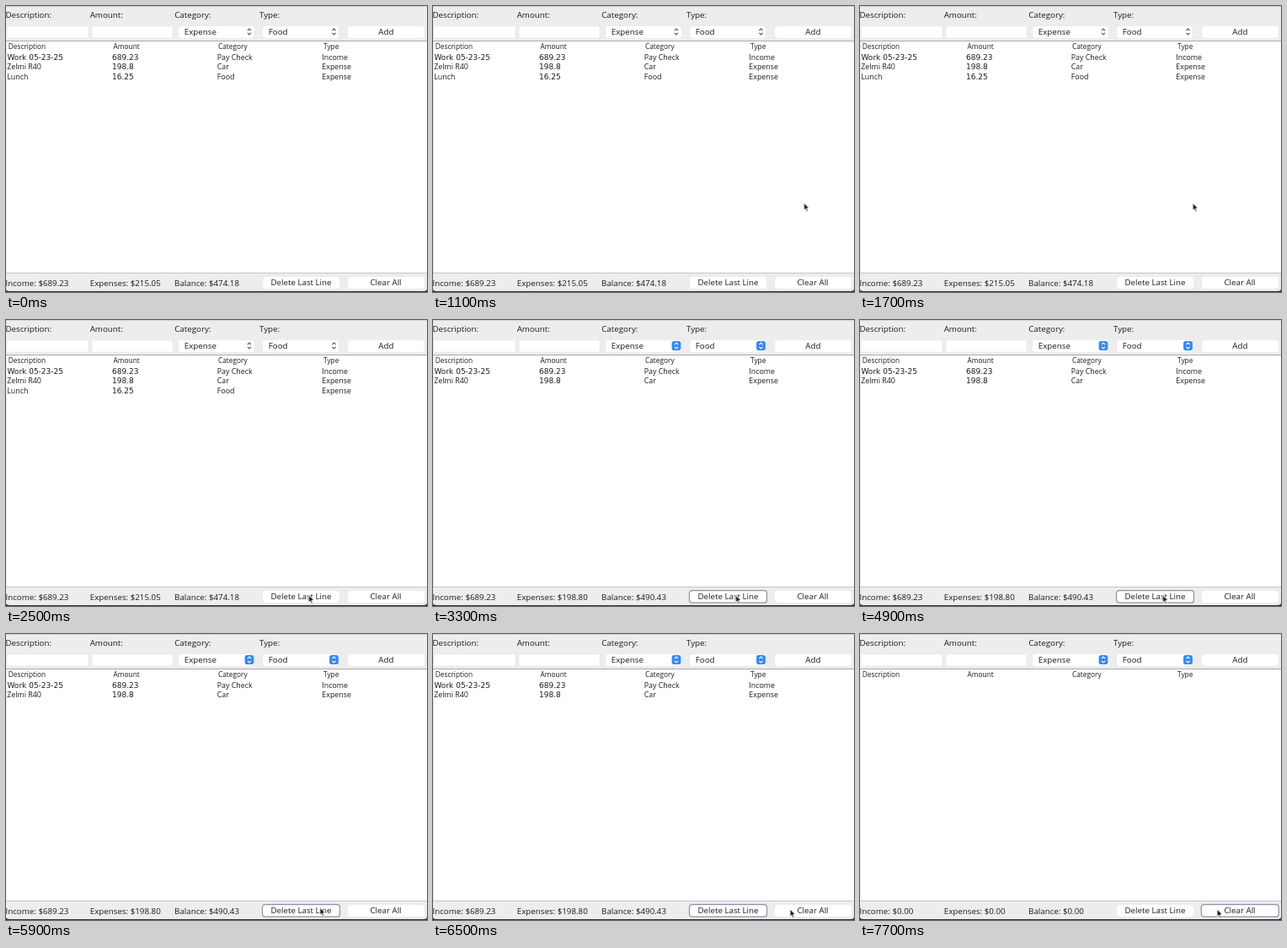
These frames come from a looping animation (500x339 px, 8 s). An HTML page:

```html
<!DOCTYPE html>
<html lang="en">
<head>
<meta charset="utf-8">
<title>Budget tracker</title>
<style>
html, body { margin: 0; width: 100%; height: 100%; overflow: hidden; background: #fff; }
svg { display: block; width: 100vw; height: 100vh; }
text { font: 500 9.75px "Open Sans", "Noto Sans", sans-serif; fill: #1c1c1c; }
.head text { font-size: 8.3px; }
.rows text { font-size: 8.9px; }
.rows .num { font: 9px "DejaVu Sans", sans-serif; }
.mid { text-anchor: middle; }
.box { fill: #fff; filter: drop-shadow(0 .5px .4px #0003); }
.field { fill: #fff; stroke: #e2e2e2; stroke-width: .5; }
.ring { fill: none; stroke: #8a94aa; stroke-width: 1.2; }
.grey { fill: none; stroke: #555; stroke-width: 1.1; }
.white { fill: none; stroke: #fff; stroke-width: 1.1; }

/* Stages: full list, last line deleted, all cleared */
.full, .kept, .cut, .blue, .clear, .cursor { animation: 8s step-end infinite; }
.full { animation-name: full; }
.kept { animation-name: kept; }
.cut { animation-name: cut; }
.blue { animation-name: blue; }
.clear { animation-name: clear; }
.cursor { animation-name: move; }
@keyframes full { 0% { visibility: visible } 41.25%, 100% { visibility: hidden } }
@keyframes kept { 0% { visibility: visible } 96.25%, 100% { visibility: hidden } }
@keyframes cut { 0% { visibility: hidden } 41.25% { visibility: visible } 96.25%, 100% { visibility: hidden } }
@keyframes blue { 0% { visibility: hidden } 41.25%, 100% { visibility: visible } }
@keyframes clear { 0% { visibility: hidden } 96.25%, 100% { visibility: visible } }
@keyframes move {
  0% { visibility: hidden; transform: translate(440.5px, 233.2px) }
  13.75% { visibility: visible; transform: translate(440.5px, 233.2px) }
  16.25% { transform: translate(395.2px, 233.5px) }
  23.75% { transform: translate(369.8px, 276.6px) }
  26.25% { transform: translate(362.8px, 302.8px) }
  28.75% { transform: translate(358.5px, 323.8px) }
  31.25% { transform: translate(359.4px, 326px) }
  48.75% { transform: translate(355.9px, 307.8px) }
  51.25% { transform: translate(353.7px, 292px) }
  56.25% { transform: translate(354.6px, 296.8px) }
  58.75% { transform: translate(357.8px, 314.7px) }
  61.25% { transform: translate(359.4px, 326px) }
  73.75% { transform: translate(372.8px, 324.3px) }
  76.25% { transform: translate(417.8px, 325.8px) }
  78.75% { transform: translate(424.3px, 326.3px) }
  81.25%, 100% { visibility: visible; transform: translate(424.1px, 326.1px) }
}
</style>
</head>
<body>
<svg viewBox="0 0 500 339" preserveAspectRatio="none">
  <defs>
    <rect id="button" width="91" height="14" rx="3"/>
    <rect id="focus" width="92" height="14.6" rx="3.3"/>
    <path id="arrows" d="M-2.1-1.4 0-3.5 2.1-1.4M-2.1 1.4 0 3.5 2.1 1.4"/>
    <rect id="knob" x="-5.4" y="-5.6" width="10.8" height="11.2" rx="2.8" fill="#3688ef"/>
  </defs>

  <rect width="500" height="339" fill="#ededed"/>
  <path d="M0 .5H500" stroke="#d2d2d2"/>
  <rect y="41" width="500" height="276" fill="#fff"/>
  <path d="M0 41.5H500" stroke="#aaa"/>
  <path d="M0 316.5H500" stroke="#c6c6c6"/>
  <path d="M.25 42V316" stroke="#c8c8c8" stroke-width=".5"/>
  <path d="M0 335.5Q.5 338 4 338H496Q499.5 338 500 335.5V339H0Z" fill="#333"/>

  <text x="-.6" y="14.2">Description:</text>
  <text x="99.7" y="14.2">Amount:</text>
  <text x="200.2" y="14.2">Category:</text>
  <text x="301" y="14.2">Type:</text>

  <rect class="field" x="1" y="24" width="97" height="14"/>
  <rect class="field" x="102" y="24" width="96" height="14"/>
  <use class="box" href="#button" x="204.5" y="24"/>
  <use class="box" href="#button" x="304.5" y="24"/>
  <use class="box" href="#button" x="406" y="24"/>
  <text x="211.8" y="34.2">Expense</text>
  <text x="311.8" y="34.2">Food</text>
  <text class="mid" x="451.3" y="34.2">Add</text>

  <g class="full">
    <use class="grey" href="#arrows" x="289" y="30.5"/>
    <use class="grey" href="#arrows" x="389.5" y="30.5"/>
  </g>
  <g class="blue">
    <use href="#knob" x="289" y="30.5"/>
    <use href="#knob" x="389.5" y="30.5"/>
    <use class="white" href="#arrows" x="289" y="30.5"/>
    <use class="white" href="#arrows" x="389.5" y="30.5"/>
  </g>

  <g class="head">
    <text x="2.8" y="51.3">Description</text>
    <text x="127.6" y="51.3">Amount</text>
    <text x="252" y="51.3">Category</text>
    <text x="377" y="51.3">Type</text>
  </g>

  <g class="rows">
    <g class="kept">
      <text class="num" x="1.5" y="64">Work 05-23-25</text>
      <text class="num" x="126" y="64">689.23</text>
      <text x="250.7" y="64">Pay Check</text>
      <text x="375.3" y="64">Income</text>
      <text x="1.2" y="75.4">Zelmi R40</text>
      <text class="num" x="126" y="75.4">198.8</text>
      <text x="250.7" y="75.4">Car</text>
      <text x="375.3" y="75.4">Expense</text>
    </g>
    <g class="full">
      <text x="1.2" y="86.8">Lunch</text>
      <text class="num" x="126" y="86.8">16.25</text>
      <text x="250.7" y="86.8">Food</text>
      <text x="375.3" y="86.8">Expense</text>
    </g>
  </g>

  <text class="kept" x="-.5" y="331.5">Income: $689.23</text>
  <g class="full">
    <text x="99.8" y="331.5">Expenses: $215.05</text>
    <text x="200.1" y="331.5">Balance: $474.18</text>
  </g>
  <g class="cut">
    <text x="99.8" y="331.5">Expenses: $198.80</text>
    <text x="200.1" y="331.5">Balance: $490.43</text>
  </g>
  <g class="clear">
    <text x="-.5" y="331.5">Income: $0.00</text>
    <text x="99.8" y="331.5">Expenses: $0.00</text>
    <text x="200.1" y="331.5">Balance: $0.00</text>
  </g>

  <use class="box" href="#button" x="305" y="321"/>
  <use class="box" href="#button" x="406" y="321"/>
  <g class="cut"><use class="ring" href="#focus" x="304.5" y="320.6"/></g>
  <g class="clear"><use class="ring" href="#focus" x="405.3" y="320.6"/></g>
  <text class="mid" x="350.5" y="331.3">Delete Last Line</text>
  <text class="mid" x="451" y="331.3">Clear All</text>

  <path class="cursor" d="M0 0V9L2 7.1 3.5 10.4 5 9.7 3.6 6.5H6.3Z" fill="#1a1a1a" stroke="#fff" stroke-width=".9"/>
</svg>
</body>
</html>
```
